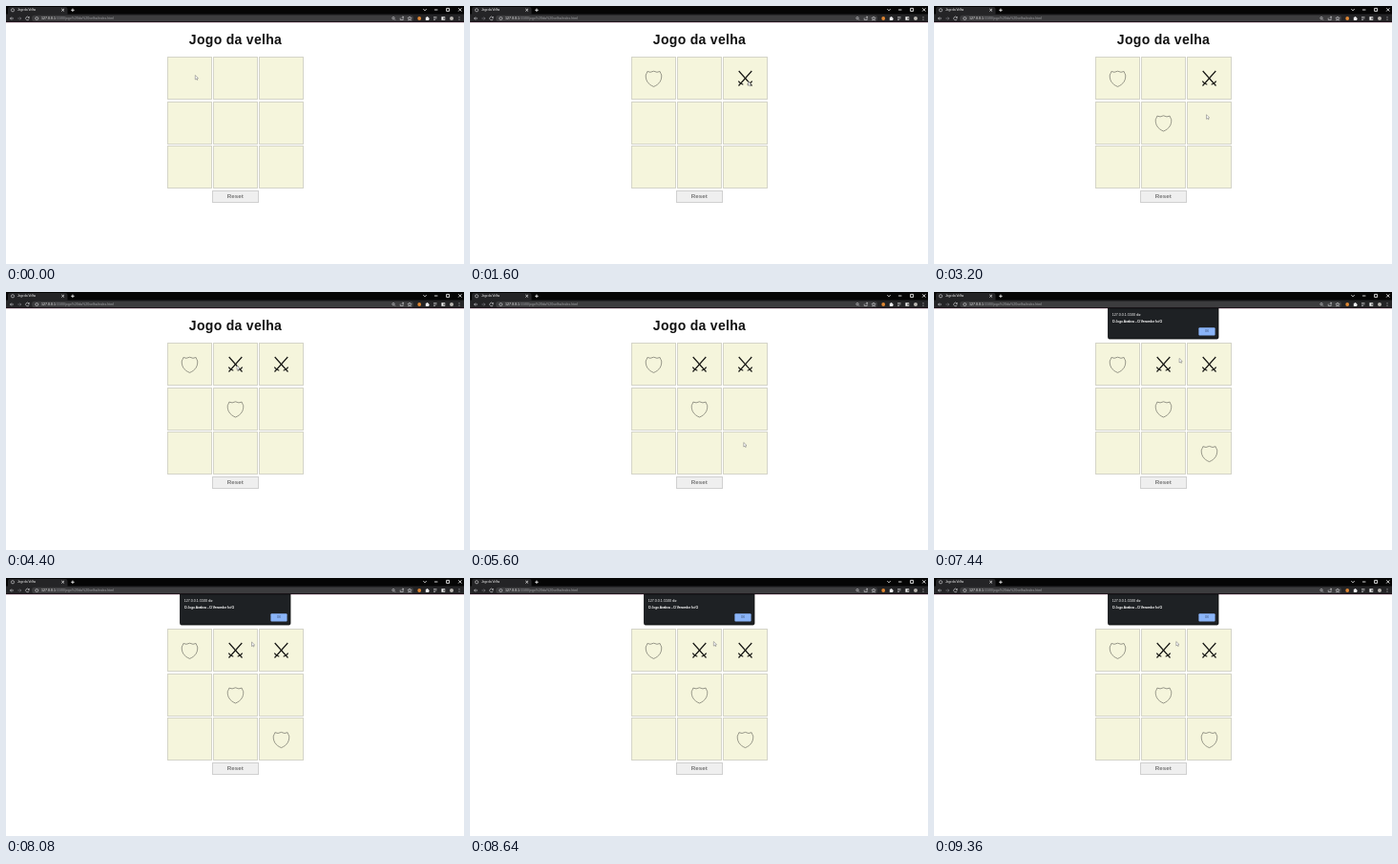
These frames come from a looping animation (480x270 px, 9.44 s). An HTML page:

```html
<!DOCTYPE html>
<html lang="pt">
<head>
<meta charset="utf-8">
<title>Jogo da Velha</title>
<style>
  html, body { margin: 0; width: 100%; height: 100%; overflow: hidden; background: #fff; }
  svg { display: block; width: 480px; height: 270px; }
  text { font-family: "Liberation Sans", Arial, sans-serif; }
  .icon { fill: none; stroke: #c4c5c8; stroke-width: .7; }
  .control { fill: none; stroke: #eee; stroke-width: .9; }
  .cell { fill: #f5f5dc; stroke: #d4d4c8; stroke-width: 1; }
  .shield { fill: none; stroke: #77776c; stroke-width: .75; stroke-linejoin: round; }
  .blade { fill: none; stroke: #151512; stroke-width: 1.15; }
</style>
</head>
<body>
<svg viewBox="0 0 480 270">
  <defs>
    <path id="shield" class="shield" d="M-6.600-7.500Q-3.600-5.800 0-7.800Q3.600-5.800 6.600-7.500Q7.200-5.600 8.200-4C8.700 1.500 6 6 0 8.400C-6 6-8.700 1.500-8.200-4Q-7.200-5.600-6.600-7.500Z"/>
    <path id="blade" class="blade" d="M-6.800-8L7 7.500M2.200 6.200Q5.200 5.400 7.200 2.600"/>
    <g id="swords"><use href="#blade"/><use href="#blade" transform="scale(-1 1)"/></g>
  </defs>

  <rect width="480" height="270" fill="#fff"/>
  <text x="240.5" y="40.4" text-anchor="middle" font-size="14" font-weight="700" letter-spacing=".3" fill="#111">Jogo da velha</text>
  <g id="board"></g>
  <rect x="216.5" y="193.5" width="48" height="12" fill="#efefef" stroke="#d0d0d0"/>
  <text x="240.3" y="201.3" text-anchor="middle" font-size="6.2" font-weight="700" fill="#777">Reset</text>

  <g id="browser">
    <rect width="480" height="9" fill="#050505"/>
    <path d="M2 9V3Q2 1 4 1H62Q64.5 1 64.5 3V9Z" fill="#242426"/>
    <rect y="8.5" width="480" height="8.5" fill="#242426"/>
    <rect x="27" y="9.8" width="400" height="6.2" rx="3.1" fill="#3c3c3e"/>
    <rect y="16.4" width="480" height=".6" fill="#211019"/>
    <rect y="17" width="480" height="1" fill="#e3d3db"/>
    <circle class="icon" cx="7" cy="4.3" r="1.6"/>
    <text x="12" y="5.4" font-size="3" fill="#fff">Jogo da Velha</text>
    <path class="control" d="M58.4 3l2.4 2.4m0-2.4L58.4 5.400M69.900 2.600v3.400m-1.700-1.700h3.400M437.400 3.200l1.600 1.600 1.600-1.600M449 4h3.400M461.600 2.400h3v3h-3zM474.200 2.300l3.200 3.200m0-3.200l-3.200 3.200"/>
    <path class="icon" d="M8 13H4.4m1.5-1.5L4.4 13l1.5 1.5M24 12a1.8 1.8 0 1 0 .2 1.5M24.3 11v1.4h-1.4"/>
    <path class="icon" style="stroke:#77787b" d="M12.3 13h3.6m-1.5-1.5l1.5 1.5-1.5 1.5"/>
    <circle class="icon" cx="32.3" cy="13" r="1.5"/>
    <text x="37" y="14.4" font-size="3.6" fill="#a2a3a6"><tspan fill="#fff">127.0.0.1</tspan>:5500/jogo%20da%20velha/index.html</text>
    <circle class="icon" cx="406" cy="12.7" r="1.2"/>
    <path class="icon" d="M407 13.7l1 1M413.2 12.5v2h3v-1.4M414.7 13l1.8-1.8m-1.4 0h1.4v1.4M423 11l.6 1.3 1.4.2-1 1 .3 1.4-1.3-.7-1.3.7.3-1.4-1-1 1.4-.2z"/>
    <circle cx="433.2" cy="13" r="1.9" fill="#e08632"/>
    <path fill="#e8e8ea" d="M439.8 11.7h1a.7.7 0 0 1 1.4 0h1v1.2a.6.6 0 0 1 0 1.2v1h-3.400z"/>
    <path class="icon" d="M448 11.6h3.5M448 13h3.5M448 14.4h2"/>
    <rect x="456.4" y="11.2" width="3.8" height="3.6" fill="#eee"/>
    <rect x="458.5" y="11.8" width="1.1" height="2.4" fill="#333"/>
    <circle cx="467" cy="13" r="2" fill="#b9b5b0"/>
    <path stroke="#c4c5c8" stroke-width=".8" stroke-dasharray=".8 .7" d="M475 11.1v4"/>
  </g>

  <g id="alert">
    <path d="M182.500 17H298V47.500Q298 49 296.500 49H184Q182.500 49 182.500 47.500Z" fill="#1e2124" stroke="#0c0d0f" stroke-width=".8"/>
    <text x="186.700" y="24.900" font-size="3.65" fill="#fff">127.0.0.1:5500 diz</text>
    <text x="187" y="32.300" font-size="3.4" fill="#fff" stroke="#fff" stroke-width=".12">O Jogo Acabou - O Vencedor foi O</text>
    <rect x="277.400" y="37.300" width="17.200" height="8.200" rx="1" fill="#8ab4f8"/>
    <text x="286" y="42.300" text-anchor="middle" font-size="2.700" fill="#35486a">OK</text>
  </g>

  <path id="cursor" d="M0 0V4.500L1.100 3.600 1.800 5 2.500 4.700 1.900 3.300 3.200 3.100Z" fill="#fff" stroke="#777" stroke-width=".55"/>
</svg>
<script>
const LOOP = 9440, STEP = 80, ALERT_AT = 6240;
const $ = id => document.getElementById(id);

function add(parent, tag, attrs) {
  const el = document.createElementNS("http://www.w3.org/2000/svg", tag);
  for (const key in attrs) el.setAttribute(key, attrs[key]);
  return parent.appendChild(el);
}

const corner = i => [169 + 48 * (i % 3), 53 + 46.6 * Math.floor(i / 3)];
for (let i = 0; i < 9; i++) {
  const [x, y] = corner(i).map(Math.round);
  add($("board"), "rect", { class: "cell", x: x + .5, y: y + .5, width: 46, height: 44 });
}

// [time, cell, piece]
const moves = [
  [400, 0, "shield"], [1280, 2, "swords"], [2800, 4, "shield"],
  [4400, 1, "swords"], [ALERT_AT, 8, "shield"]
].map(([at, cell, piece]) => {
  const [x, y] = corner(cell);
  const el = add($("board"), "use", { href: "#" + piece, transform: `translate(${x + 23.5} ${y + 23})` });
  return { at, el };
});

// [time, x, y] of the pointer tip
const path = [
  [0, 198.3, 72.5], [640, 198.3, 73], [1200, 289, 77], [1600, 291.5, 79],
  [2080, 290, 82], [2480, 268, 100], [2720, 241, 119], [2880, 242, 119],
  [3200, 285.5, 113.8], [3520, 285, 112], [4160, 242, 77], [4560, 242, 77],
  [5200, 280, 145], [5520, 286.8, 157.5], [6240, 286.8, 157.5],
  [6720, 259.5, 132], [7200, 257, 70], [8080, 257.5, 67],
  [8800, 255, 66.5], [9360, 253.8, 66.5], [LOOP, 253.8, 66.5]
];

function pointerAt(t) {
  const i = path.findIndex(p => p[0] > t);
  const [a, b] = [path[i - 1], path[i]];
  const u = (t - a[0]) / (b[0] - a[0]), k = u * u * (3 - 2 * u);
  return [a[1] + (b[1] - a[1]) * k, a[2] + (b[2] - a[2]) * k];
}

const show = (el, on) => el.setAttribute("visibility", on ? "visible" : "hidden");
const start = performance.now();

function draw() {
  const t = Math.floor((performance.now() - start) % LOOP / STEP) * STEP;
  moves.forEach(m => show(m.el, t >= m.at));
  show($("alert"), t >= ALERT_AT);
  $("cursor").setAttribute("transform", `translate(${pointerAt(t)})`);
  requestAnimationFrame(draw);
}
draw();
</script>
</body>
</html>
```
